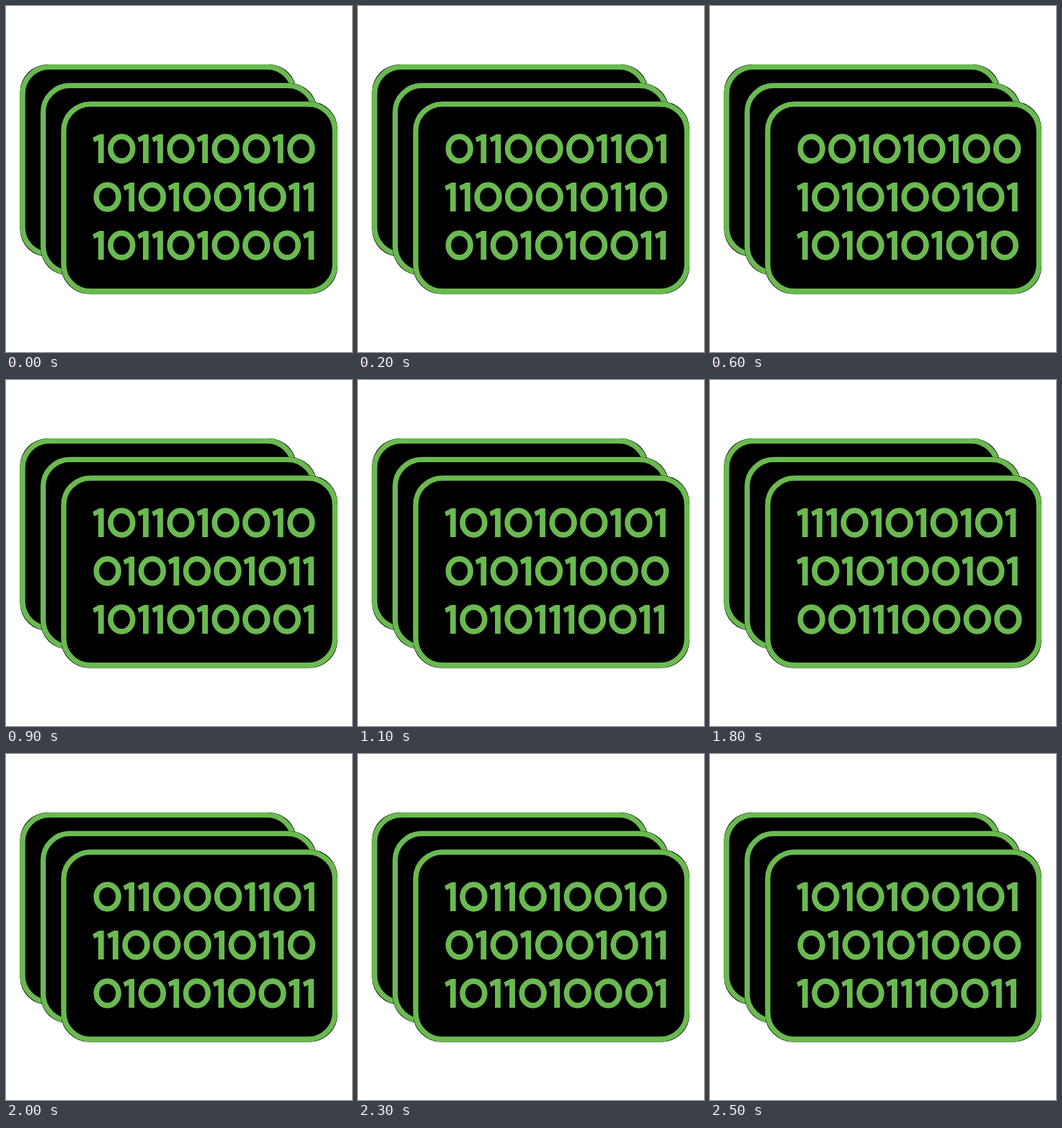
An HTML page with a canvas for the animation above (2.7 s loop, 480 by 480 pixels).

```html
<!DOCTYPE html>
<html lang="en">
<head>
<meta charset="utf-8">
<title>Binary cards</title>
<style>
  html, body { margin: 0; width: 100%; height: 100%; overflow: hidden; background: #fff; }
  canvas { display: block; width: 480px; height: 480px; }
</style>
</head>
<body>
<canvas id="stage" width="480" height="480" role="img" aria-label="Stacked cards with changing binary digits"></canvas>
<script>
const ctx = document.getElementById('stage').getContext('2d');
const GREEN = '#6aba50';
const LOOP = 2700;

const screens = {
  A: ['1011010010', '0101001011', '1011010001'],
  B: ['001010100', '1010100101', '1010101010'],
  C: ['1010100101', '010101000', '10101110011'],
  D: ['11101010101', '1010100101', '001110000'],
  E: ['0110001101', '1100010110', '0101010011']
};

// Start time and screen, all hard cuts
const cues = [
  [0, 'A'], [200, 'E'], [400, 'D'], [600, 'B'], [900, 'A'], [1100, 'C'], [1300, 'A'],
  [1400, 'B'], [1600, 'C'], [1800, 'D'], [2000, 'E'], [2300, 'A'], [2500, 'C']
];

const rowY = [198, 265, 332];
const inkWidth = { 0: 38.4, 1: 15.4 };
const inkStart = { 0: 121.5, 1: 120.3 };
const gap = { '00': 4.2, '01': 2.8, '10': 5.5, '11': 4.7 };

function card(x, y) {
  const w = 383.6, h = 267, line = 7.3;
  // The black base shows as a thin edge around the green corners
  ctx.beginPath();
  ctx.roundRect(x, y, w, h, 38.5);
  ctx.fillStyle = '#000';
  ctx.fill();
  ctx.beginPath();
  ctx.roundRect(x + line / 2, y + line / 2, w - line, h - line, 37);
  ctx.strokeStyle = GREEN;
  ctx.lineWidth = line;
  ctx.stroke();
}

function zero(x, y) {
  const line = 7.7;
  ctx.beginPath();
  ctx.ellipse(x + inkWidth[0] / 2, y, (inkWidth[0] - line) / 2, (41.6 - line) / 2, 0, 0, Math.PI * 2);
  ctx.lineWidth = line;
  ctx.stroke();
}

function one(x, y) {
  const right = x + inkWidth[1], stem = right - 7.8, top = y - 20;
  ctx.beginPath();
  ctx.moveTo(right, y + 20);
  ctx.lineTo(stem, y + 20);
  ctx.lineTo(stem, top + 8.4);
  ctx.lineTo(x + 2, top + 11);
  ctx.lineTo(x, top + 4.8);
  ctx.lineTo(x + 9.2, top);
  ctx.lineTo(right, top);
  ctx.fill();
}

function row(digits, y) {
  let x = inkStart[digits[0]];
  for (let i = 0; i < digits.length; i++) {
    (digits[i] === '0' ? zero : one)(x, y);
    x += inkWidth[digits[i]] + (gap[digits.slice(i, i + 2)] || 0);
  }
}

function draw(name) {
  ctx.fillStyle = '#fff';
  ctx.fillRect(0, 0, 480, 480);
  card(19.4, 81);
  card(47.9, 106.8);
  card(76.4, 132.4);
  ctx.fillStyle = ctx.strokeStyle = GREEN;
  screens[name].forEach((digits, i) => row(digits, rowY[i]));
}

const start = performance.now();
function tick() {
  const t = (performance.now() - start) % LOOP;
  draw(cues.filter(cue => cue[0] <= t).pop()[1]);
  requestAnimationFrame(tick);
}
tick();
</script>
</body>
</html>
```
